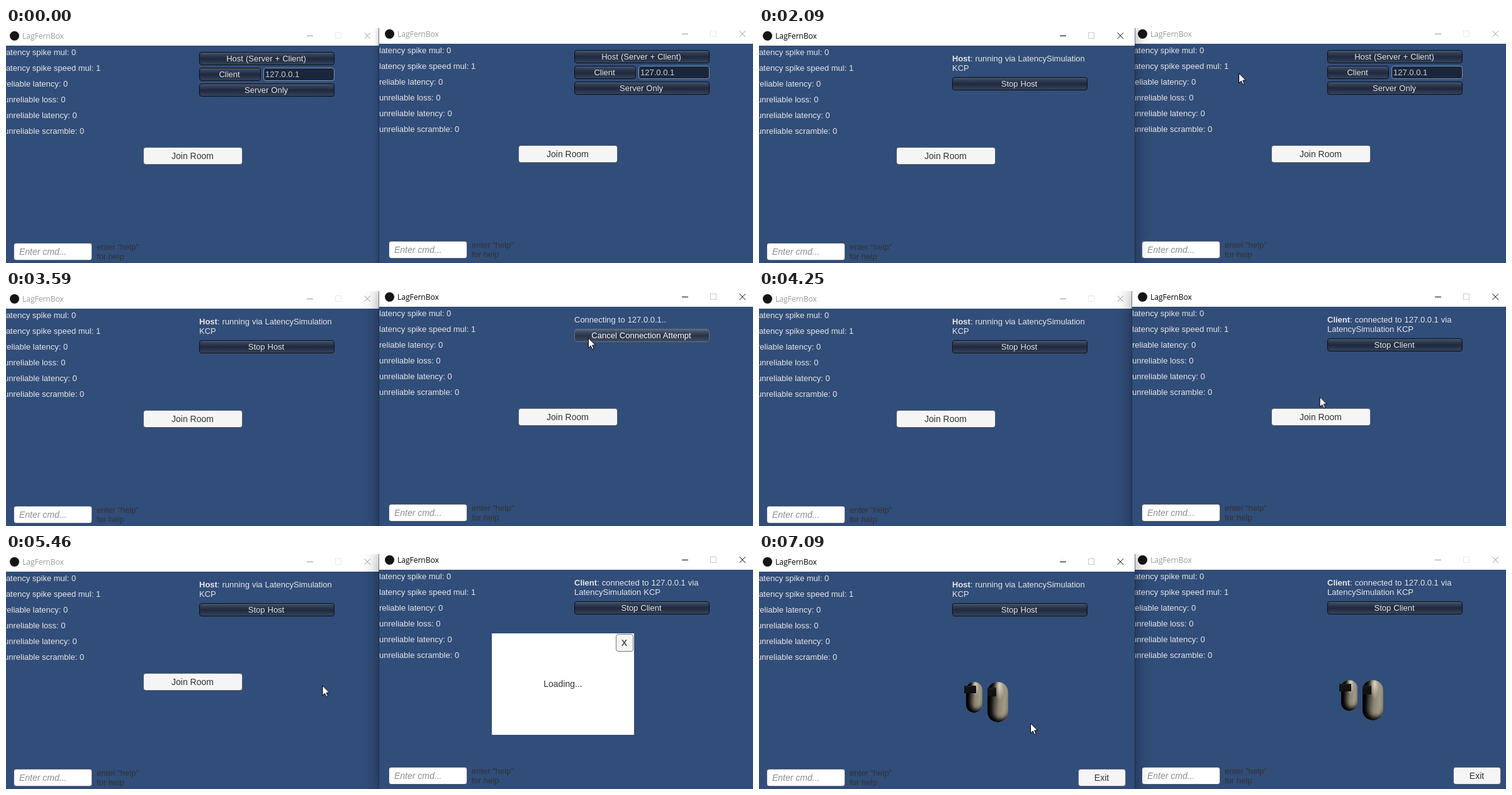
Write an HTML page that moves like this. It is 1187 px wide and 373 px high and loops after 8000 ms.

```html
<!DOCTYPE html>
<html lang="en">
<head>
<meta charset="utf-8">
<title>Network demo</title>
<style>
html, body { margin: 0; width: 100%; height: 100%; overflow: hidden; background: #314d79; }
#stage { position: relative; width: 1187px; height: 373px; overflow: hidden; background: #314d79; }
#stage * { position: absolute; box-sizing: border-box; white-space: nowrap; }
#stage b.in { position: static; }

/* windows */
.win {
  width: 600px; height: 390px; background: #314d79; overflow: hidden;
  font: 13px/15px "Liberation Sans", Arial, sans-serif;
  animation: 8s step-end infinite;
  --edge: 0 0 0 1px rgba(25, 35, 55, .55);
}
.left { left: -3px; top: 0; animation-name: focusLeft; }
.right { left: 593px; top: -3px; z-index: 2; animation-name: focusRight; }
.bar { left: 0; top: 0; width: 600px; height: 28px; background: #fff; }
.icon { left: 9px; top: 5px; width: 15px; height: 15px; border-radius: 50%; background: #151515; }
.name { left: 29px; top: 4px; font: 12px/18px "Open Sans", "Noto Sans", sans-serif; }
.bar svg { left: 470px; top: 0; }
.label { left: 0; line-height: 25px; color: #e6e6e6; }

/* network panel */
.panel { left: 310px; top: 0; width: 215px; height: 115px; color: #e6e6e6; word-spacing: .4px;
  animation: 8s step-end infinite; }
.note { left: 0; top: 41px; }
.btn, .glow {
  height: 21px; border: 1px solid #0a0f18; border-radius: 4px; text-align: center; line-height: 19px;
  padding-right: 2px;
  background: linear-gradient(#4a576d, #323f55 20%, #1f2a3f 50%, #222d42 60%, #36435a);
}
.glow { border-color: #66707f; color: #fff; animation: 8s step-end infinite;
  background: linear-gradient(#5d697f, #414d63 20%, #283449 50%, #2b374c 60%, #3f4c63); }
.addr { left: 102px; top: 63px; width: 113px; height: 21px; border: 1px solid #8492a8; border-radius: 4px;
  background: #1a263b; color: #c9cdd4; padding-left: 2px; line-height: 19px; }

/* room controls */
.light { height: 28px; border: 1px solid rgba(120, 112, 105, .5); border-radius: 4px;
  background: #f5f5f5 padding-box; color: #323232; text-align: center;
  font-size: 14px; line-height: 26px; padding-right: 1px; }
.join { left: 221px; top: 189px; width: 158px; animation: untilScene 8s step-end infinite; }
.cmd { left: 15px; top: 341px; width: 125px; padding-left: 8px; text-align: left;
  font-style: italic; color: #8c8c8c; background-color: #fff; }
.help { left: 147px; top: 340px; color: #323232; }
.dialog { left: 179px; top: 129px; width: 226px; height: 161px; background: #fff; color: #323232;
  font-size: 14px; line-height: 161px; text-align: center; animation: dialog 8s step-end infinite; }
.close { left: 197px; top: 1px; width: 28px; border-color: #777; font-weight: bold; color: #555; }
.scene { left: 0; top: 0; width: 600px; height: 390px; animation: fromScene 8s step-end infinite; }
.exit { left: 510px; top: 341px; width: 76px; }
.cap { border-radius: 99px; box-shadow: inset 4px -5px 7px #000; background:
  radial-gradient(ellipse at 58% 9%, rgba(226, 219, 200, .95), transparent 30%),
  linear-gradient(95deg, #000 14%, #38352d 30%, #8a8474 55%, #a19a87 78%, #8b8474); }
.visor { background: linear-gradient(#242424, #141414 20%, #101010); }

/* pointer */
#pointer { left: 0; top: 0; z-index: 9; animation: move 8s ease-in-out infinite; }
#pointer i { left: -12px; top: -12px; width: 24px; height: 24px; border-radius: 50%;
  background: rgba(250, 243, 60, .68); animation: press 8s step-end infinite; }
#pointer svg { left: 0; top: 0; }

/* states; 1% = 80 ms */
@keyframes focusLeft {
  0%, 38.25% { z-index: 1; color: #999; box-shadow: var(--edge), 0 0 9px rgba(0, 0, 0, .35); }
  17.125%, 78.25%, to { z-index: 3; color: #000; box-shadow: var(--edge), 0 0 24px rgba(0, 0, 0, .42); }
}
@keyframes focusRight {
  0%, 78.25%, to { color: #999; box-shadow: var(--edge), 0 0 9px rgba(0, 0, 0, .35); }
  38.25% { color: #000; box-shadow: var(--edge), 0 0 24px rgba(0, 0, 0, .42); }
}
@keyframes leftMenu { 0% { opacity: 1; } 26.1%, to { opacity: 0; } }
@keyframes leftHost { 0% { opacity: 0; } 26.1%, to { opacity: 1; } }
@keyframes rightMenu { 0% { opacity: 1; } 44.85%, to { opacity: 0; } }
@keyframes rightWait { 0% { opacity: 0; } 44.85% { opacity: 1; } 46.7%, to { opacity: 0; } }
@keyframes rightClient { 0% { opacity: 0; } 46.7%, to { opacity: 1; } }
@keyframes hoverHost { 0% { opacity: 0; } 14.6%, to { opacity: 1; } }
@keyframes hoverClient { 0% { opacity: 0; } 30.2%, to { opacity: 1; } }
@keyframes hoverStop { 0% { opacity: 1; } 51.3%, to { opacity: 0; } }
@keyframes dialog { 0% { opacity: 0; } 58.1% { opacity: 1; } 80.6%, to { opacity: 0; } }
@keyframes untilScene { 0% { opacity: 1; } 80.6%, to { opacity: 0; } }
@keyframes fromScene { 0% { opacity: 0; } 80.6%, to { opacity: 1; } }
@keyframes press {
  0%, 18.375%, 40.125%, 57.75%, 79.25%, to { opacity: 0; }
  16.875%, 37.875%, 56.25%, 77.95% { opacity: 1; }
}
@keyframes move {
  0%, 3.86% { transform: translate(1042px, 400px); }
  3.87% { transform: translate(1042px, 362px); }
  8.375%, 10.375% { transform: translate(640px, 172px); }
  15.6%, 20.6% { transform: translate(489px, 47px); }
  23%, 26.1% { transform: translate(762px, 71px); }
  31.5%, 32% { transform: translate(917px, 75px); }
  34.125%, 49% { transform: translate(925px, 74px); }
  55%, 62.375% { transform: translate(882px, 191px); }
  70.75%, 73.625% { transform: translate(417px, 212px); }
  77% { transform: translate(352px, 206px); }
  80.6% { transform: translate(352px, 206px); animation-timing-function: ease-in; }
  83.7% { transform: translate(385px, 229px); animation-timing-function: ease-out; }
  86.5%, 88.375% { transform: translate(429px, 267px); }
  88.6%, to { transform: translate(431px, 268px); }
}
</style>
</head>
<body>
<div id="stage">
  <div id="pointer">
    <i></i>
    <svg width="14" height="21"><path d="M.5 .8V16.4L4.2 13 6.7 18.6 9.1 17.6 6.7 12H11.6Z" fill="#fff" stroke="#000"/></svg>
  </div>
</div>
<script>
const box = (cls, text, style = '') => `<div class="${cls}" style="${style}">${text}</div>`;

// Button with an optional highlighted copy on top
function button(text, y, w = 215, hover = '') {
  const at = `left:0;top:${y}px;width:${w}px;`;
  return box('btn', text, at) + (hover && box('glow', text, `${at}animation-name:${hover}`));
}

const panel = (state, html) => box('panel', html, `animation-name:${state}`);
const note = html => box('note', html);
const bold = text => `<b class="in">${text}</b>`;

const menu = (state, hostHover, clientHover) => panel(state,
  button('Host (Server + Client)', 38, 215, hostHover) +
  button('Client', 63, 98, clientHover) +
  box('addr', '127.0.0.1') +
  button('Server Only', 88));

const labels = ['latency spike mul: 0', 'latency spike speed mul: 1', 'reliable latency: 0',
  'unreliable loss: 0', 'unreliable latency: 0', 'unreliable scramble: 0']
  .map((text, i) => box('label', text, `top:${26 + 25 * i}px`)).join('');

const part = (cls, x, y, w, h) => box(cls, '', `left:${x}px;top:${y}px;width:${w}px;height:${h}px`);

const bar = box('bar',
  box('icon', '') + box('name', 'LagFernBox') +
  `<svg width="130" height="28" fill="none" stroke="currentColor">
    <path d="M11 12.5h10"/><path d="M102.5 7.5l9.5 9.5m0-9.5l-9.5 9.5"/>
    <rect x="56.5" y="7.5" width="9" height="9" stroke-opacity=".22"/></svg>`);

const scene = box('scene',
  part('cap', 332, 203, 26, 49) + part('visor', 329, 209, 19, 12) +
  part('cap', 366, 203, 33, 64) + part('visor', 366, 212, 14, 14) +
  box('light exit', 'Exit'));

const win = (side, content) => box(`win ${side}`,
  bar + labels + box('light join', 'Join Room') + box('light cmd', 'Enter cmd...') +
  box('help', 'enter "help"<br>for help') + scene + content);

const left = win('left',
  menu('leftMenu', 'hoverHost', '') +
  panel('leftHost', note(bold('Host') + ': running via LatencySimulation<br>KCP') + button('Stop Host', 78)));

const right = win('right',
  menu('rightMenu', '', 'hoverClient') +
  panel('rightWait', note('Connecting to 127.0.0.1..') + button('Cancel Connection Attempt', 63, 215, 'none')) +
  panel('rightClient', note(bold('Client') + ': connected to 127.0.0.1 via<br>LatencySimulation KCP') +
    button('Stop Client', 78, 215, 'hoverStop')) +
  box('dialog', 'Loading...' + box('light close', 'X')));

document.getElementById('stage').insertAdjacentHTML('afterbegin', left + right);
</script>
</body>
</html>
```
